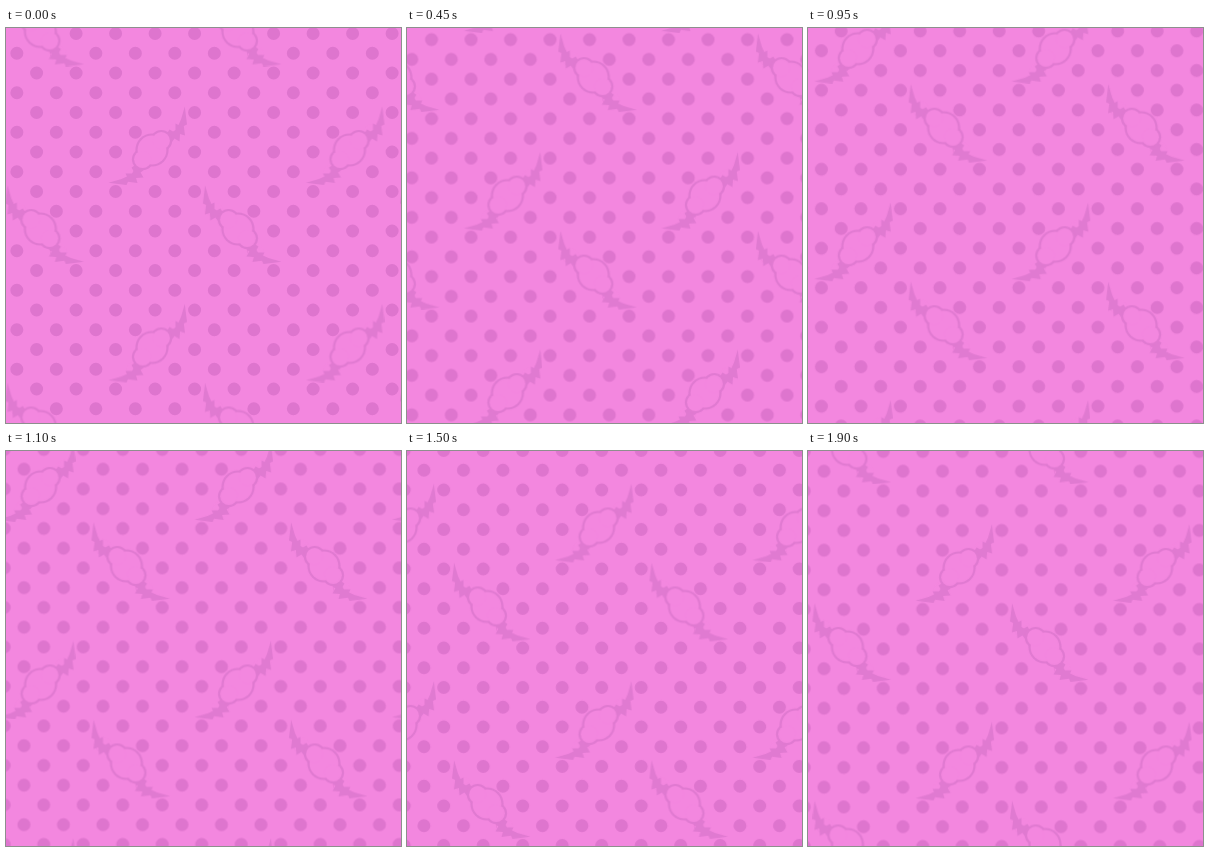
Recreate the animation shown at these times as an HTML page without scripts. Size 395 by 395 pixels, loop 1950 ms.

```html
<!DOCTYPE html>
<html lang="en">
<head>
<meta charset="utf-8">
<title>Candy pattern</title>
<style>
  :root { --pink: #f387df; --dot: #de75ce; --candy: #e07ad1; }
  html, body { margin: 0; width: 100%; height: 100%; overflow: hidden; background: var(--pink); }
  svg { display: block; width: 100%; height: 100%; }
  .dots { fill: none; stroke: var(--dot); stroke-width: 13; stroke-linecap: round; stroke-dasharray: 0 39.5; }
  .line { fill: var(--candy); }
  .gap { fill: var(--pink); }
  .drift { animation: drift 1950ms steps(39) infinite; }
  @keyframes drift { to { transform: translate(-197.5px, 197.5px); } }
</style>
</head>
<body>
<svg viewBox="0 0 395 395">
  <defs>
    <g id="wing">
      <circle class="gap" cx="22.6" cy="-17.7" r="7.8"/>
      <path class="line" d="M32.8-43.5L35-25.5 31.8-24 33-14.5 28-16 27.5-8.5 22.5-11.5 20-8 14-15 17.5-20.5 21-18.5 23.5-20 23.5-26.5 26.5-25 29-30.5Z"/>
    </g>
    <g id="candy">
      <use href="#wing"/>
      <use href="#wing" transform="matrix(0 1 1 0 0 0)"/>
      <g class="line">
        <circle r="16.6"/><circle cx="9.3" cy="-9.3" r="10.8"/><circle cx="-9.3" cy="9.3" r="10.8"/>
      </g>
      <g class="gap">
        <circle r="14.4"/><circle cx="9.3" cy="-9.3" r="8.6"/><circle cx="-9.3" cy="9.3" r="8.6"/>
      </g>
    </g>

    <g id="pair">
      <use href="#candy" x="146" y="122"/>
      <use href="#candy" transform="translate(34.4 201) scale(-1 1)"/>
    </g>
    <path id="spots" class="dots" d="M30.6 5.5h159m-159 39.5h159m-159 39.5h159m-159 39.5h159m-159 39.5h159
      M10.85 25.25h159m-159 39.5h159m-159 39.5h159m-159 39.5h159m-159 39.5h159"/>

    <g id="spotRow">
      <use href="#spots"/><use href="#spots" x="197.5"/><use href="#spots" x="395"/>
    </g>
    <g id="pairRow">
      <use href="#pair"/><use href="#pair" x="197.5"/><use href="#pair" x="395"/>
    </g>
  </defs>

  <g class="drift">
    <use href="#spotRow" y="-197.5"/>
    <use href="#spotRow"/>
    <use href="#spotRow" y="197.5"/>
    <use href="#pairRow" y="-395"/>
    <use href="#pairRow" y="-197.5"/>
    <use href="#pairRow"/>
    <use href="#pairRow" y="197.5"/>
  </g>
</svg>
</body>
</html>
```
